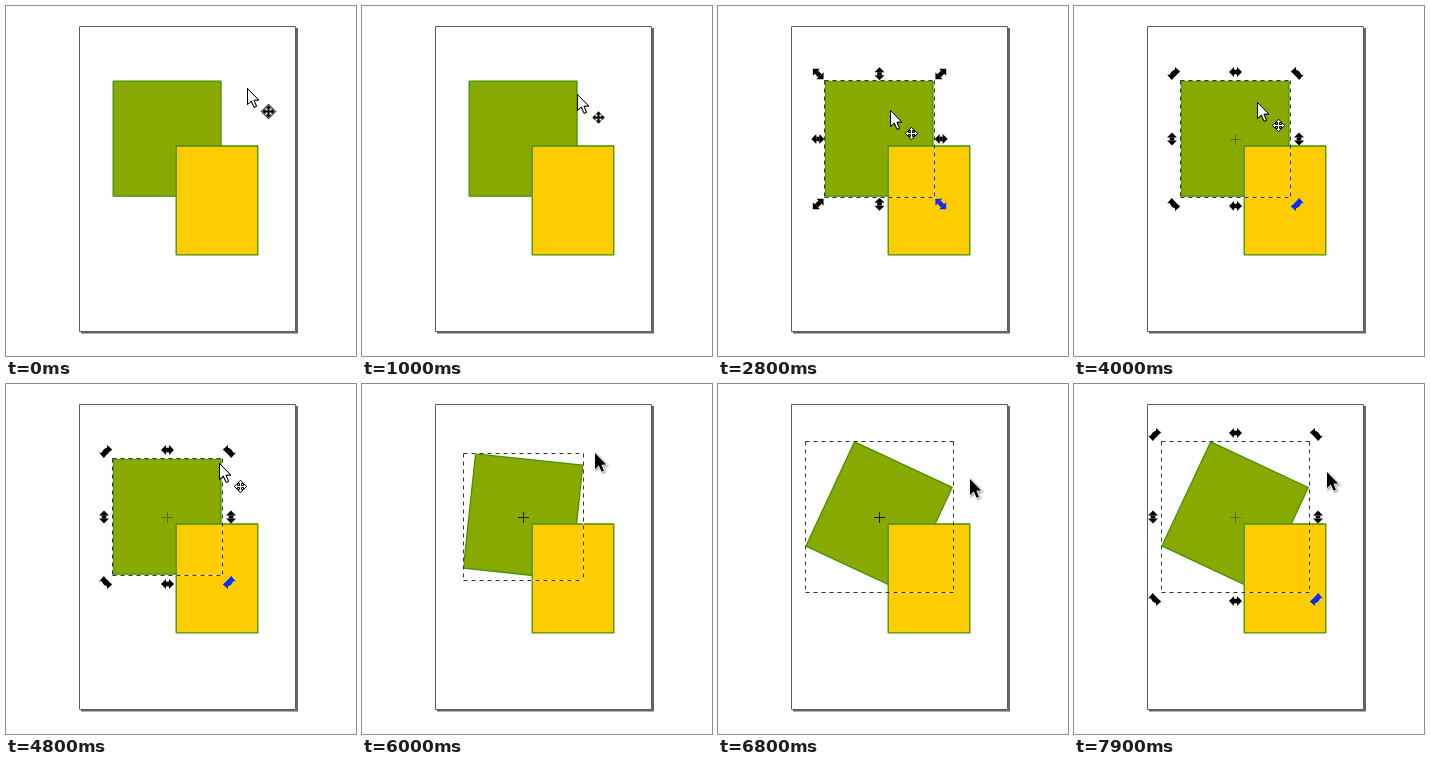
Write an HTML page with a canvas that moves like this. It is 350 px wide and 350 px high and loops after 8000 ms.

```html
<!DOCTYPE html>
<html lang="en">
<head>
<meta charset="utf-8">
<title>Select and rotate</title>
<style>
html, body { margin: 0; width: 100%; height: 100%; overflow: hidden; background: #fff; }
canvas { display: block; width: 350px; height: 350px; }
</style>
</head>
<body>
<canvas id="stage" width="350" height="350"></canvas>
<script>
const ctx = document.getElementById('stage').getContext('2d');
const LOOP = 8000, STEP = 100, QUARTER = Math.PI / 2;
const CENTER = { x: 161.1, y: 132.7 }, W = 107.8, H = 115;
const FULL_TURN = 25.1, GRAB_ANGLE = -47.6;

const clamp01 = v => Math.min(1, Math.max(0, v));
const progress = (t, from, to) => clamp01((t - from) / (to - from));
const smooth = p => p * p * (3 - 2 * p);
const easeOut = p => 1 - (1 - p) ** 1.5;
const radians = deg => deg * Math.PI / 180;

const turnAt = t => FULL_TURN * smooth(progress(t, 5600, 6850));

// While turning, the pointer orbits the centre together with the grabbed corner.
function orbit(turn) {
  const r = 94.8 + 0.15 * turn, a = radians(GRAB_ANGLE + turn);
  return { x: CENTER.x + r * Math.cos(a), y: CENTER.y + r * Math.sin(a) };
}

function pointerAt(t) {
  let p = { x: 241, y: 82 };
  const glide = (from, to, x, y) => {
    const k = easeOut(progress(t, from, to));
    p = { x: p.x + (x - p.x) * k, y: p.y + (y - p.y) * k };
  };
  glide(600, 1500, 196, 92);
  glide(1500, 2100, 173, 104);
  glide(2400, 2500, 172, 104);
  glide(3300, 3500, 183, 96);
  glide(4300, 4800, 213, 79);
  glide(4800, 5200, 220, 64);
  if (t >= 5700) p = orbit(turnAt(t));
  glide(7500, 7900, 253, 88);
  return { x: Math.round(p.x), y: Math.round(p.y) };
}

function at(x, y, angle, draw) {
  ctx.save();
  ctx.translate(x, y);
  ctx.rotate(angle);
  draw();
  ctx.restore();
}

function poly(points) {
  ctx.beginPath();
  points.forEach(([x, y]) => ctx.lineTo(x, y));
  ctx.closePath();
}

function box(x, y, w, h, fill) {
  ctx.fillStyle = fill;
  ctx.strokeStyle = '#459000';
  ctx.lineWidth = 1.3;
  ctx.lineJoin = 'round';
  ctx.beginPath();
  ctx.rect(x, y, w, h);
  ctx.fill();
  ctx.stroke();
}

function page() {
  ctx.fillStyle = '#fff';
  ctx.fillRect(0, 0, 350, 350);
  ctx.fillStyle = '#666';
  ctx.fillRect(75, 22, 217, 305.5);
  ctx.fillStyle = '#fff';
  ctx.fillRect(73, 20, 217, 306);
  ctx.strokeStyle = '#5c5c5c';
  ctx.lineWidth = 1;
  ctx.strokeRect(73.5, 20.5, 216, 305);
}

function bounds(angle) {
  const c = Math.cos(angle), s = Math.sin(angle);
  const hw = (W * c + H * s) / 2 + 0.7, hh = (H * c + W * s) / 2 + 0.7;
  const snap = v => Math.floor(v + 0.4) + 0.5;
  return {
    l: snap(CENTER.x - hw), r: snap(CENTER.x + hw),
    t: snap(CENTER.y - hh), b: snap(CENTER.y + hh)
  };
}

function dashes({ l, r, t, b }) {
  ctx.lineWidth = 1;
  ctx.strokeStyle = 'rgba(255,255,255,.6)';
  ctx.strokeRect(l, t, r - l, b - t);
  ctx.strokeStyle = '#333';
  ctx.setLineDash([4, 4]);
  ctx.beginPath();
  [[l, t, r, t], [l, b, r, b], [l, t, l, b], [r, t, r, b]].forEach(([x, y, u, v]) => {
    ctx.moveTo(x, y);
    ctx.lineTo(u, v);
  });
  ctx.stroke();
  ctx.setLineDash([]);
}

function doubleArrow(half) {
  const neck = half - 5;
  for (const side of [-1, 1]) {
    poly([[side * half, 0], [side * neck, -5], [side * neck, 5]]);
    ctx.fill();
  }
  ctx.fillRect(-neck, -2.3, 2 * neck, 4.6);
}

function bentArrow() {
  ctx.lineWidth = 4.2;
  ctx.beginPath();
  ctx.arc(2.5, 2.5, 5, Math.PI, Math.PI * 1.5);
  ctx.stroke();
  poly([[-7, 0.8], [2.2, 0.8], [-2.4, 6]]);
  ctx.fill();
  poly([[0.8, -7], [0.8, 2.2], [6, -2.4]]);
  ctx.fill();
}

function handles({ l, r, t, b }, rotating) {
  const mx = (l + r) / 2, my = (t + b) / 2, gap = rotating ? 8.5 : 6.7;
  for (let i = 0; i < 4; i++) {
    const sx = i === 1 || i === 2 ? 1 : -1, sy = i < 2 ? -1 : 1;
    const dx = Math.round(Math.cos(i * QUARTER)), dy = Math.round(Math.sin(i * QUARTER));
    ctx.fillStyle = '#000';
    at(mx + dx * ((r - l) / 2 + gap), my + dy * ((b - t) / 2 + gap),
      (i + rotating) * QUARTER, () => doubleArrow(6.5));
    ctx.fillStyle = ctx.strokeStyle = i === 2 ? '#0a2cff' : '#000';
    at(mx + sx * ((r - l) / 2 + 6.3), my + sy * ((b - t) / 2 + 6.5),
      (rotating ? i : i + 0.5) * QUARTER, rotating ? bentArrow : () => doubleArrow(7.6));
  }
}

function pivot(strong) {
  ctx.strokeStyle = strong ? 'rgba(0,0,0,.85)' : 'rgba(80,80,80,.75)';
  ctx.lineWidth = 1;
  ctx.beginPath();
  ctx.moveTo(156, 133.5);
  ctx.lineTo(167, 133.5);
  ctx.moveTo(161.5, 128);
  ctx.lineTo(161.5, 139);
  ctx.stroke();
}

function moveCross() {
  const arm = [[-1, -1], [-1, -3], [-3, -3], [0, -6.3], [3, -3], [1, -3]];
  const points = [];
  for (let i = 0; i < 4; i++) {
    const c = Math.cos(i * QUARTER), s = Math.sin(i * QUARTER);
    arm.forEach(([x, y]) => points.push([x * c - y * s, x * s + y * c]));
  }
  poly(points);
}

function badge(kind) {
  ctx.lineJoin = 'miter';
  ctx.lineWidth = 1;
  ctx.strokeStyle = '#000';
  if (kind === 'diamond') {
    poly([[0, -7.3], [7.3, 0], [0, 7.3], [-7.3, 0]]);
    ctx.fillStyle = '#fff';
    ctx.fill();
    ctx.stroke();
  }
  moveCross();
  if (kind === 'thin') {
    ctx.fillStyle = '#fff';
    ctx.fill();
    ctx.stroke();
    return;
  }
  if (kind === 'bold') {
    ctx.strokeStyle = '#fff';
    ctx.lineWidth = 2;
    ctx.stroke();
  }
  ctx.fillStyle = '#000';
  ctx.fill();
}

function pointer({ x, y }, dark, kind) {
  const shift = dark ? 0 : 0.5;
  at(x + shift, y + shift, 0, () => {
    poly([[0, 0], [0, 16], [3.8, 12.5], [6.6, 18.8], [9, 17.8], [6.4, 11.7], [11.2, 11.5]]);
    ctx.lineJoin = 'miter';
    ctx.lineWidth = dark ? 1.5 : 1;
    ctx.fillStyle = dark ? '#000' : '#fff';
    ctx.strokeStyle = dark ? '#fff' : '#000';
    if (dark) {
      ctx.shadowColor = 'rgba(0,0,0,.5)';
      ctx.shadowOffsetX = ctx.shadowOffsetY = 1;
      ctx.shadowBlur = 2;
    }
    ctx.stroke();
    ctx.shadowColor = 'transparent';
    ctx.fill();
    if (!dark) ctx.stroke();
  });
  if (!dark) at(x + 21.5, y + 23.5, 0, () => badge(kind));
}

function badgeKind(t, x) {
  if (t < 2500 && x > 215) return 'diamond';
  const pressed = t >= 2500 && t < 3400 || t >= 3800;
  return pressed ? 'thin' : 'bold';
}

function draw(t) {
  const angle = radians(turnAt(t)), tip = pointerAt(t);
  const rotating = t >= 4000, dragging = t >= 5700 && t < 7100;

  page();
  at(CENTER.x, CENTER.y, angle, () => box(-W / 2, -H / 2, W, H, '#88aa00'));
  box(170.2, 140, 81.6, 108.8, '#ffcc00');

  if (t >= 2800) {
    const area = bounds(angle);
    dashes(area);
    if (!dragging) handles(area, rotating);
    if (rotating) pivot(dragging);
  }
  pointer(tip, t >= 5000, badgeKind(t, tip.x));
}

const start = performance.now();
function tick() {
  const t = (performance.now() - start) % LOOP;
  draw(Math.floor(t / STEP) * STEP);
  requestAnimationFrame(tick);
}
tick();
</script>
</body>
</html>
```
